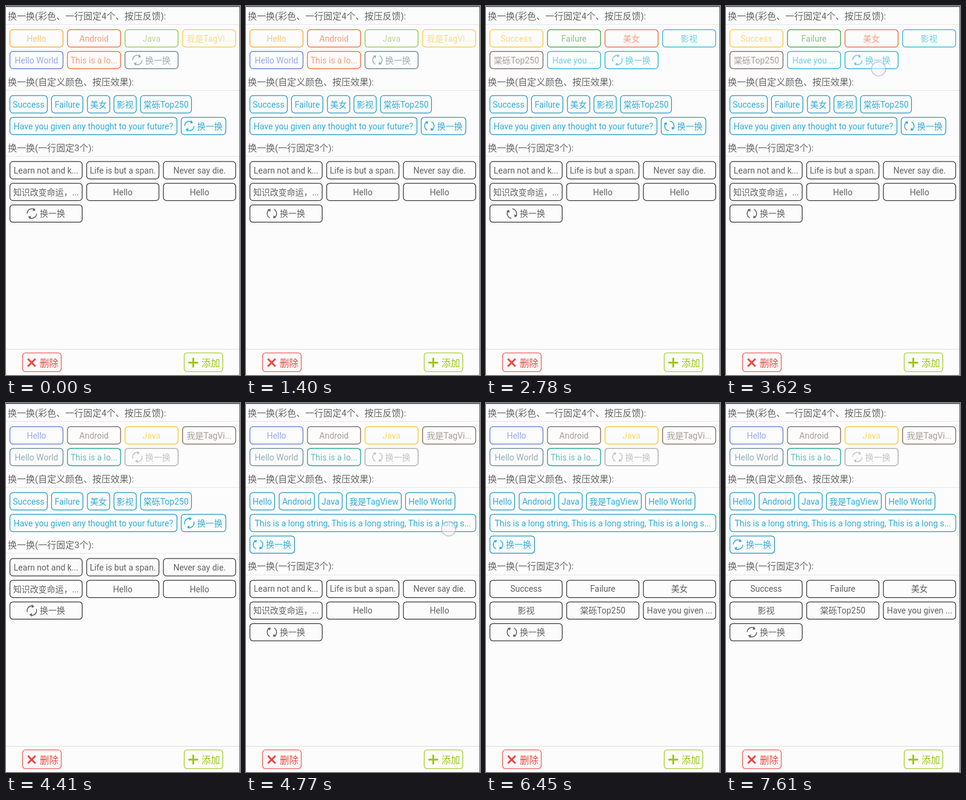
These frames come from a looping animation (388x610 px, 7.71 s). An HTML page:

```html
<!DOCTYPE html>
<html lang="zh-CN">
<head>
<meta charset="utf-8">
<title>换一换</title>
<style>
html, body { margin: 0; width: 100%; height: 100%; overflow: hidden; background: #fcfcfc; }
svg { display: block; width: 388px; height: 610px; }
text { font-family: Roboto, "Noto Sans CJK SC", "Noto Sans CJK", sans-serif; font-size: 14px; white-space: pre; }
.title { font-size: 15px; fill: #666; }
.btn { font-size: 15.5px; }
</style>
</head>
<body>
<svg id="stage" viewBox="0 0 388 610"></svg>
<script>
const NS = 'http://www.w3.org/2000/svg';
const LOOP = 7710;
const stage = document.getElementById('stage');
const MORE = '换一换';
const words = ['Success', 'Failure', '美女', '影视', '棠砾Top250'];
const spinners = [[], [], []];

function add(parent, name, attrs = {}, text) {
  const el = document.createElementNS(NS, name);
  for (const key in attrs) el.setAttribute(key, attrs[key]);
  if (text) el.textContent = text;
  parent.appendChild(el);
  return el;
}

function addIcon(parent, x, y, color, group) {
  const place = add(parent, 'g', { transform: `translate(${x} ${y})` });
  const spin = add(place, 'g');
  for (const turn of [0, 180]) {
    const half = add(spin, 'g', { transform: `rotate(${turn})` });
    add(half, 'path', { d: 'M-3.4 7A7.8 7.8 0 0 1-5-6', fill: 'none', stroke: color, 'stroke-width': 1.5 });
    add(half, 'path', { d: 'M-7.3-6.9L-2-7.7L-3-2.8Z', fill: color });
  }
  spinners[group].push(spin);
}

function addTag(parent, x, y, w, label, line, ink, alpha, group) {
  add(parent, 'rect', { x: x + .5, y: y + .5, width: w - 1, height: 28.6, rx: 5, fill: 'none', stroke: line, 'stroke-width': 1.25 });
  const face = add(parent, 'g', { opacity: alpha });
  const mid = x + w / 2;
  if (label === MORE) {
    addIcon(face, mid - 23.5, y + 14.8, ink, group);
    add(face, 'text', { x: mid - 10.5, y: y + 20, fill: ink }, label);
  } else {
    add(face, 'text', { x: mid, y: y + 20, fill: ink, 'text-anchor': 'middle' }, label);
  }
}

function addTitle(parent, y, label) {
  add(parent, 'text', { class: 'title', x: 3, y: y + 5.5 }, label);
  add(parent, 'rect', { x: 0, y: y + 14, width: 387, height: 1, fill: '#e6e6e6' });
}

// Equal columns, filled row by row
function addGrid(parent, top, cols, labels, colors, ink, alpha, group) {
  const pitch = 381.7 / cols;
  labels.forEach((label, i) => addTag(parent, 6 + i % cols * pitch, top + Math.floor(i / cols) * 35.8,
    pitch - 6.4, label, colors[i % colors.length], ink || colors[i], alpha, group));
}

// Rows of [label, left, right]
function addFlow(parent, top, rows) {
  rows.forEach((row, r) => row.forEach(([label, l, right]) =>
    addTag(parent, l, top + r * 35.8, right - l, label, '#1f98c6', '#30abd7', 1, 1)));
}

// Window chrome
add(stage, 'rect', { width: 388, height: 610, fill: '#fcfcfc' });
add(stage, 'rect', { width: 388, height: 1.5, fill: '#3a4f60' });
add(stage, 'rect', { x: 387, width: 1, height: 610, fill: '#59636b' });

// Colourful four-column group
const hello = ['Hello', 'Android', 'Java', '我是TagVi...', 'Hello World', 'This is a lo...', MORE];
const done = [...words, 'Have you ...', MORE];
addTitle(stage, 16, '换一换(彩色、一行固定4个、按压反馈):');
const first = [
  [hello, ['#f9a825', '#f4602c', '#8bc34a', '#f9c93a', '#5677e0', '#f4602c', '#607d8b']],
  [done, ['#f9c22e', '#3c9c3b', '#f4602c', '#16b4da', '#795f56', '#16b0e0', '#16b0e0']],
  [hello, ['#5677e8', '#795f56', '#fcc419', '#795f56', '#607d8b', '#0a9c8c', '#a2a2a2']]
].map(([labels, colors]) => {
  const g = add(stage, 'g');
  addGrid(g, 38.7, 4, labels, colors, null, .62, 0);
  return g;
});

// Blue flowing group
addTitle(stage, 125, '换一换(自定义颜色、按压效果):');
const second = [
  [[['Success', 6, 69], ['Failure', 75, 128], ['美女', 134.5, 172.5], ['影视', 178.5, 216.5], [words[4], 222.5, 308]],
   [['Have you given any thought to your future?', 6, 284], [MORE, 290, 365]]],
  [[['Hello', 6, 48], ['Android', 54.5, 114], ['Java', 120, 160], ['我是TagView', 166, 258], ['Hello World', 264, 347]],
   [['This is a long string, This is a long string, This is a long s...', 6, 381.5]],
   [[MORE, 6, 81]]]
].map(rows => {
  const g = add(stage, 'g');
  addFlow(g, 147.7, rows);
  return g;
});

// Grey three-column group
const lower = add(stage, 'g');
addTitle(lower, 234, '换一换(一行固定3个):');
const third = [
  ['Learn not and k...', 'Life is but a span.', 'Never say die.', '知识改变命运，...', 'Hello', 'Hello', MORE],
  [...words, 'Have you given ...', MORE]
].map(labels => {
  const g = add(lower, 'g');
  addGrid(g, 256.7, 3, labels, ['#383838'], '#626262', 1, 2);
  return g;
});

// Bottom bar
add(stage, 'rect', { y: 567, width: 387, height: 1, fill: '#dedede' });
function addButton(x, label, color, sign) {
  add(stage, 'rect', { x: x + .5, y: 573.5, width: 64, height: 31, rx: 5, fill: 'none', stroke: color, 'stroke-width': 1.1 });
  add(stage, 'path', { d: sign, transform: `translate(${x + 15.5} 589.5)`, stroke: color, 'stroke-width': 3, fill: 'none' });
  add(stage, 'text', { class: 'btn', x: x + 29, y: 595.5, fill: color }, label);
}
addButton(27, '删除', '#ee4540', 'M-6.3-6.3L6.3 6.3M6.3-6.3L-6.3 6.3');
addButton(295, '添加', '#99c811', 'M-8 0H8M0-8V8');

const dot = add(stage, 'circle', { r: 11.7, fill: '#f4f4ff', 'fill-opacity': .55, stroke: '#a9aed2', 'stroke-opacity': .75, 'stroke-width': 1.4 });

// [time, degrees]
const turns = [[0, 65], [60, 72], [470, 180], [1400, 180], [2120, 360], [3620, 720], [4290, 720],
  [4770, 900], [5430, 1145], [6450, 1440], [7190, 1440], [7610, 1505], [LOOP, 1505]];
// [start, end, x, y]
const taps = [[2000, 2300, 256, 105], [3500, 3800, 253, 104], [4590, 4890, 336, 208], [5970, 6270, 80, 386]];

function angleAt(t) {
  const i = turns.findIndex(p => p[0] > t);
  const [t0, a] = turns[i - 1], [t1, b] = turns[i];
  return a + (b - a) * (t - t0) / (t1 - t0);
}

function show(list, index) {
  list.forEach((g, i) => g.setAttribute('display', i === index ? 'inline' : 'none'));
}

function draw(t) {
  const firstState = t < 2180 ? 0 : t < 3680 ? 1 : 2;
  const moved = t >= 4710;
  show(first, firstState);
  show(second, +moved);
  show(third, t >= 6150 ? 1 : 0);
  lower.setAttribute('transform', `translate(0 ${moved ? 35.8 : 0})`);

  const angle = angleAt(t);
  spinners.forEach((list, i) => {
    const lag = i === 0 && firstState === 1 ? 115 : 0;
    list.forEach(el => el.setAttribute('transform', `rotate(${angle - lag})`));
  });

  const tap = taps.find(([from, to]) => t >= from && t < to);
  dot.setAttribute('display', tap ? 'inline' : 'none');
  if (tap) {
    dot.setAttribute('cx', tap[2]);
    dot.setAttribute('cy', tap[3]);
    dot.setAttribute('opacity', Math.min(1, (tap[1] - t) / 60));
  }
}

const start = performance.now();
function tick() {
  draw((performance.now() - start) % LOOP);
  requestAnimationFrame(tick);
}
tick();
</script>
</body>
</html>
```
